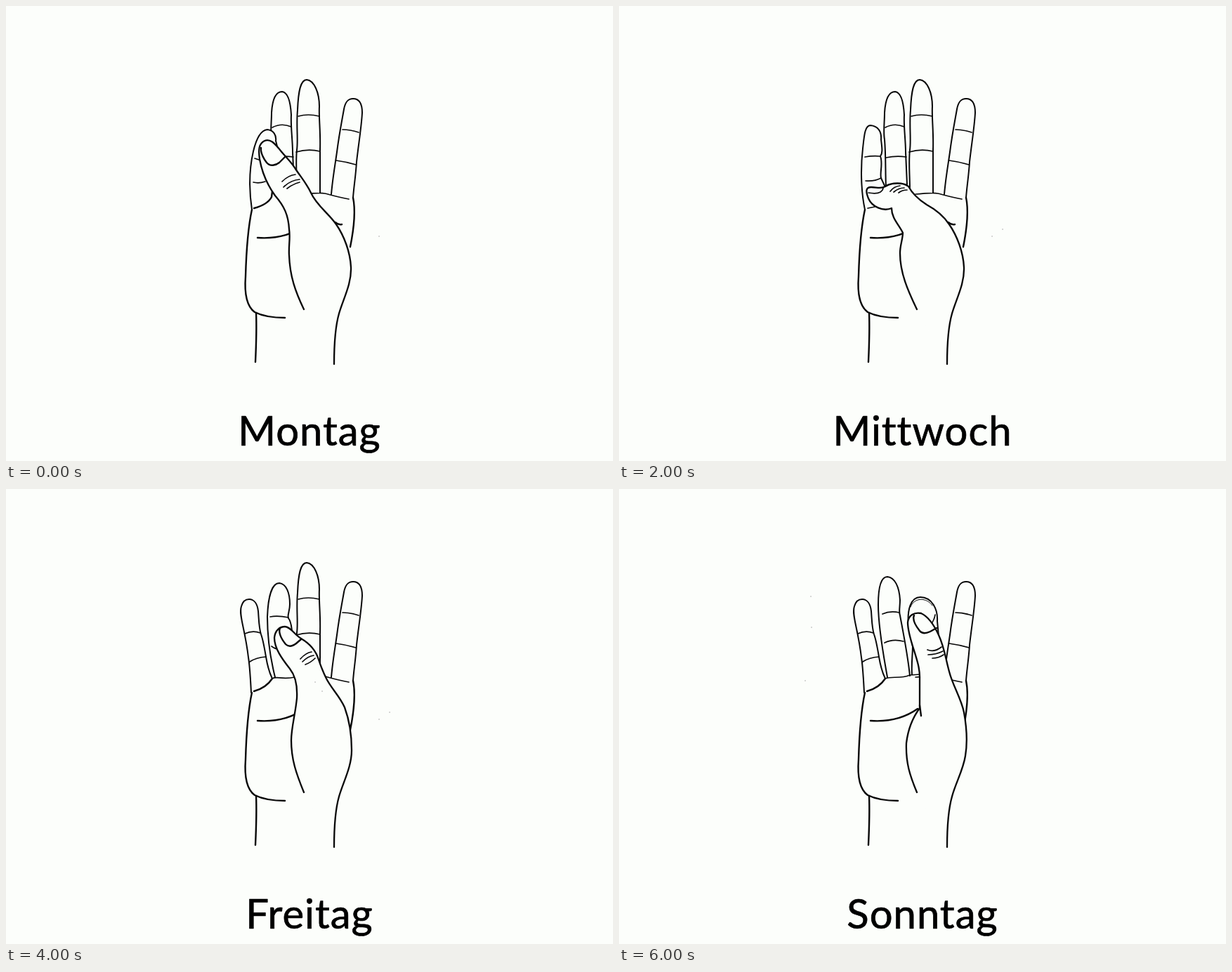
An HTML page that plays this animation: 864 by 648 pixels, repeating every 7000 ms.

```html
<!DOCTYPE html>
<html lang="de">
<head>
<meta charset="utf-8">
<title>Wochentage</title>
<style>
  html, body { margin: 0; width: 100%; height: 100%; overflow: hidden; background: #fcfefb; }
  svg { display: block; width: 864px; height: 648px; stroke-linecap: round; stroke-linejoin: round; }
  path { fill: #fcfefb; stroke: #080808; stroke-width: 2; }
  .thumb { stroke-width: 2.3; }
  .line { fill: none; stroke-width: 2.4; }
  .crease { fill: none; stroke-width: 1.7; }
  .faint { fill: none; stroke-width: 1; }
  .speck { fill: none; stroke: #999; stroke-width: 1.3; }
  text {
    font: 58px Lato, Carlito, sans-serif; font-variant-ligatures: none; letter-spacing: 1px;
    text-anchor: middle; fill: #000; stroke: #000; stroke-width: .7;
  }
  .day { visibility: hidden; animation: show 7s step-end infinite; animation-delay: calc(var(--i) * 1s - 7s); }
  @keyframes show {
    0% { visibility: visible; }
    14.2857%, 100% { visibility: hidden; }
  }
</style>
</head>
<body>
<svg viewBox="0 0 864 648">
  <defs>
    <g id="middle">
      <path d="M414 263C414 240 412 222 414 205C416 190 413 170 415 148C416 122 419 105 428 105C439 106 446 124 446 143C445 158 448 180 447 205L447 266"/>
      <path class="crease" d="M416 157Q430 153 446 157M413 208Q430 203 447 207"/>
    </g>
    <g id="ring">
      <path d="M380 258C379 235 380 215 378 190C376 180 378 165 378 152C379 135 383 122 393 122C402 123 405 137 406 155C405 172 408 190 408 208L410 254"/>
      <path class="crease" d="M379 173Q392 166 406 172M380 216Q394 213 409 215"/>
    </g>
    <g id="pinky">
      <path d="M349 290C348 270 347 252 345 240C343 222 340 208 337 194C334 180 333 173 335 167C337 160 341 157 346 157C354 157 358 165 359 174C360 187 360 198 363 207C366 215 368 227 370 239C372 251 375 262 379 270"/>
      <path class="crease" d="M340 206Q351 201 362 205M347 246Q356 240 370 239"/>
      <path class="line" d="M353 288C364 285 373 279 379 270"/>
    </g>
    <path id="crook" class="line" d="M469 308Q473 312 478 311"/>
    <path id="ringBase" class="crease" d="M379 270C385 266 393 272 411 268"/>
    <path id="speckR" class="speck" d="M531 328h.1"/>
    <path id="speckT" class="speck" d="M546 318h.1"/>
    <path id="specksL" class="speck" d="M273 153h.1M274 197h.1M265 273h.1"/>
  </defs>

  <!-- parts that never change -->
  <path d="M463 268C465 245 468 229 471 208C474 184 478 164 481 147C483 136 487 132 494 132C503 132 507 140 507 152C506 172 502 195 499 222C498 240 495 258 494 273"/>
  <path class="line" d="M494 273C498 292 495 318 490 343"/>
  <path class="crease" d="M479 176Q490 176 502 180M470 220Q485 222 498 226M422 268C438 267 446 265 454 267S472 272 488 275"/>
  <path class="line" d="M350 290C344 318 342 350 341 385C339 411 343 428 354 436C366 442 380 444 397 444"/>
  <path class="line" d="M356 437C357 462 356 485 355 507"/>
  <path class="line" d="M358 330C385 332 408 325 425 313"/>

  <g class="day" style="--i:0">
    <use href="#middle"/><use href="#ring"/>
    <path d="M350 290C346 263 346 233 352 207C356 190 362 177 372 176C381 177 385 184 384 192L387 204"/>
    <path class="crease" d="M354 217L360 219M352 251Q360 253 369 250"/>
    <path class="line" d="M353 288C364 285 374 280 378 272L379 264"/>
    <path class="thumb" d="M424 432C412 407 404 385 403 355C402 342 405 330 403 318C402 298 396 285 383 270C370 252 364 235 361 218C359 204 360 196 368 192C377 188 384 198 390 205C398 215 406 222 412 232C420 244 428 253 434 266C442 284 459 295 470 311C481 327 490 350 491 372C492 396 480 417 474 438C468 459 467 482 467 510"/>
    <path class="line" d="M363 202C362 209 367 218 371 223C376 229 384 227 389 223L397 215"/>
    <path class="crease" d="M393 250Q402 241 412 240M395 258Q405 248 418 247M400 260Q409 253 418 251"/>
    <use href="#crook"/><use href="#speckR"/>
    <text x="432" y="626">Montag</text>
  </g>

  <g class="day" style="--i:1">
    <use href="#middle"/><use href="#ring"/>
    <path d="M350 290C346 263 345 233 349 211C353 190 359 176 367 175C377 175 381 187 380 200C379 210 378 216 374 218L378 225"/>
    <path class="crease" d="M354 217Q365 215 374 218M351 251Q357 253 363 251"/>
    <path class="line" d="M353 288C364 285 373 281 379 277"/>
    <path class="thumb" d="M424 432C412 405 402 385 401 355C401 341 405 330 402 318C400 305 394 292 388 283C373 276 361 259 358 240C357 230 360 223 366 220C374 219 379 231 388 234C398 239 408 240 415 245C422 250 426 260 431 268C442 282 459 295 470 311C481 327 490 350 491 372C492 396 480 417 474 438C468 459 467 482 467 510"/>
    <path class="crease" d="M360 226C361 233 365 242 369 247C374 249 381 243 388 235"/>
    <path class="line" d="M393 258Q400 250 410 250M395 263Q404 255 416 253M400 265Q409 261 417 256"/>
    <use href="#crook"/><use href="#speckR"/><use href="#speckT"/>
    <text x="432" y="626">Dienstag</text>
  </g>

  <g class="day" style="--i:2">
    <use href="#middle"/><use href="#ring"/>
    <path d="M350 290C344 262 344 228 347 203C349 184 350 170 358 170C368 171 374 178 373 190C374 200 376 209 372 214C376 224 371 238 373 245L379 258"/>
    <path class="crease" d="M350 215Q361 213 372 214M351 249Q364 250 373 245M354 288L364 286"/>
    <path class="thumb" d="M424 432C411 405 400 380 400 352C400 340 404 332 404 323C398 311 388 302 388 288C376 293 360 286 355 274C351 264 351 258 359 258C367 258 373 261 379 257C388 251 405 251 412 257C418 268 427 276 438 283C451 290 462 299 470 311C481 327 490 350 491 372C492 396 480 417 474 438C468 459 467 482 467 510"/>
    <path class="crease" d="M355 266Q367 268 372 265Q376 262 376 259M386 264Q391 257 400 256M391 265Q398 259 406 259M398 266Q403 262 410 262"/>
    <use href="#crook"/><use href="#speckR"/><use href="#speckT"/>
    <text x="432" y="626">Mittwoch</text>
  </g>

  <g class="day" style="--i:3">
    <use href="#middle"/><use href="#pinky"/>
    <path d="M383 268C379 245 374 212 374 188C375 166 381 154 392 154C403 154 410 162 409 175L411 190"/>
    <path class="crease" d="M378 192Q382 200 388 201M379 222Q384 228 392 228"/>
    <use href="#ringBase"/>
    <path class="thumb" d="M424 432C414 405 407 385 407 358C407 335 413 315 413 295C413 275 410 258 400 243C390 228 387 215 387 203C387 194 390 188 396 184C402 179 409 179 414 185C420 192 424 200 426 208C435 224 447 246 452 262C457 280 471 290 478 304C485 320 489 340 491 368C492 396 480 417 474 438C468 459 467 482 467 510"/>
    <path class="line" d="M396 185C392 191 398 202 402 209C405 215 411 213 415 211L425 205"/>
    <path class="crease" d="M420 235Q428 230 436 230M419 242Q430 236 440 236M424 248Q433 245 440 240"/>
    <path class="speck" d="M450 288h.1"/>
    <use href="#speckR"/><use href="#speckT"/>
    <text x="432" y="626">Donnerstag</text>
  </g>

  <g class="day" style="--i:4">
    <use href="#middle"/><use href="#pinky"/>
    <path d="M383 268C376 240 372 207 372 182C373 155 378 134 389 134C399 135 404 148 404 164C404 174 400 180 402 184C406 189 406 195 407 202"/>
    <path class="crease" d="M376 182Q387 180 402 183M378 224Q383 228 389 228"/>
    <use href="#ringBase"/>
    <path class="thumb" d="M424 432C413 405 406 385 406 358C406 340 412 320 414 298C415 280 412 266 404 256C393 242 382 227 382 212C383 201 390 196 397 196C405 196 410 207 420 213C432 220 441 230 445 243C448 252 452 262 456 270C463 284 475 295 482 311C489 330 492 350 492 372C492 396 480 417 474 438C468 459 467 482 467 510"/>
    <path class="line" d="M390 198C387 206 394 216 398 221C403 226 409 223 413 220L420 214"/>
    <path class="crease" d="M419 242Q427 233 435 232M422 246Q430 238 438 237M426 250Q434 247 440 241"/>
    <path class="speck" d="M440 275h.1M450 288h.1"/>
    <use href="#speckR"/><use href="#speckT"/>
    <text x="432" y="626">Freitag</text>
  </g>

  <g class="day" style="--i:5">
    <use href="#middle"/><use href="#pinky"/>
    <path d="M383 268C378 240 371 200 371 165C371 140 374 125 383 125C393 126 399 138 400 155C400 165 398 172 400 180C404 200 407 218 408 238"/>
    <path class="crease" d="M375 178Q386 173 399 176M377 219Q390 214 406 217M379 270Q384 266 391 272"/>
    <path class="thumb" d="M424 432C412 408 405 390 405 366C406 345 414 328 425 314C415 306 416 286 420 273C405 278 390 273 384 259C381 247 382 236 390 237C399 238 409 237 416 237C426 234 438 233 444 237C452 243 457 262 464 274C472 288 483 298 487 314C491 330 494 352 492 374C491 396 480 417 474 438C468 459 467 482 467 510"/>
    <path class="crease" d="M384 248C393 249 404 252 409 245Q410 240 407 238M421 245Q425 237 434 237M426 246Q431 239 441 238M433 247Q437 241 446 240"/>
    <path class="speck" d="M440 275h.1M450 288h.1"/>
    <use href="#speckT"/><use href="#specksL"/>
    <text x="432" y="626">Samstag</text>
  </g>

  <g class="day" style="--i:6">
    <use href="#pinky"/>
    <path d="M382 268C377 240 369 198 369 165C369 140 373 125 382 125C393 126 399 140 400 158C400 168 398 175 400 180C404 202 411 236 414 266"/>
    <path class="crease" d="M375 178Q386 173 399 176M378 219Q390 213 405 217"/>
    <path d="M417 264C416 248 418 236 418 224L412 195C410 172 415 154 429 154C446 154 454 172 453 188L455 210"/>
    <path class="crease" d="M379 270C388 266 400 271 414 265L429 264M444 193Q449 186 450 179"/>
    <path class="faint" d="M415 168C420 154 438 154 446 166"/>
    <path class="thumb" d="M424 432C414 408 408 390 409 362C411 345 417 327 428 312L428 270C429 244 411 215 411 190C412 180 420 175 430 177C441 182 449 195 455 208C463 225 465 242 470 260C475 280 487 298 491 318C495 340 496 362 493 380C490 400 479 419 474 438C468 459 467 482 467 510"/>
    <path class="line" d="M428 308L430 323M420 180C417 187 424 197 428 202C432 207 439 205 443 203L452 198"/>
    <path class="crease" d="M439 229Q449 233 459 225M440 236Q451 236 461 231M446 241Q455 241 462 236"/>
    <use href="#specksL"/>
    <text x="432" y="626">Sonntag</text>
  </g>
</svg>
</body>
</html>
```
